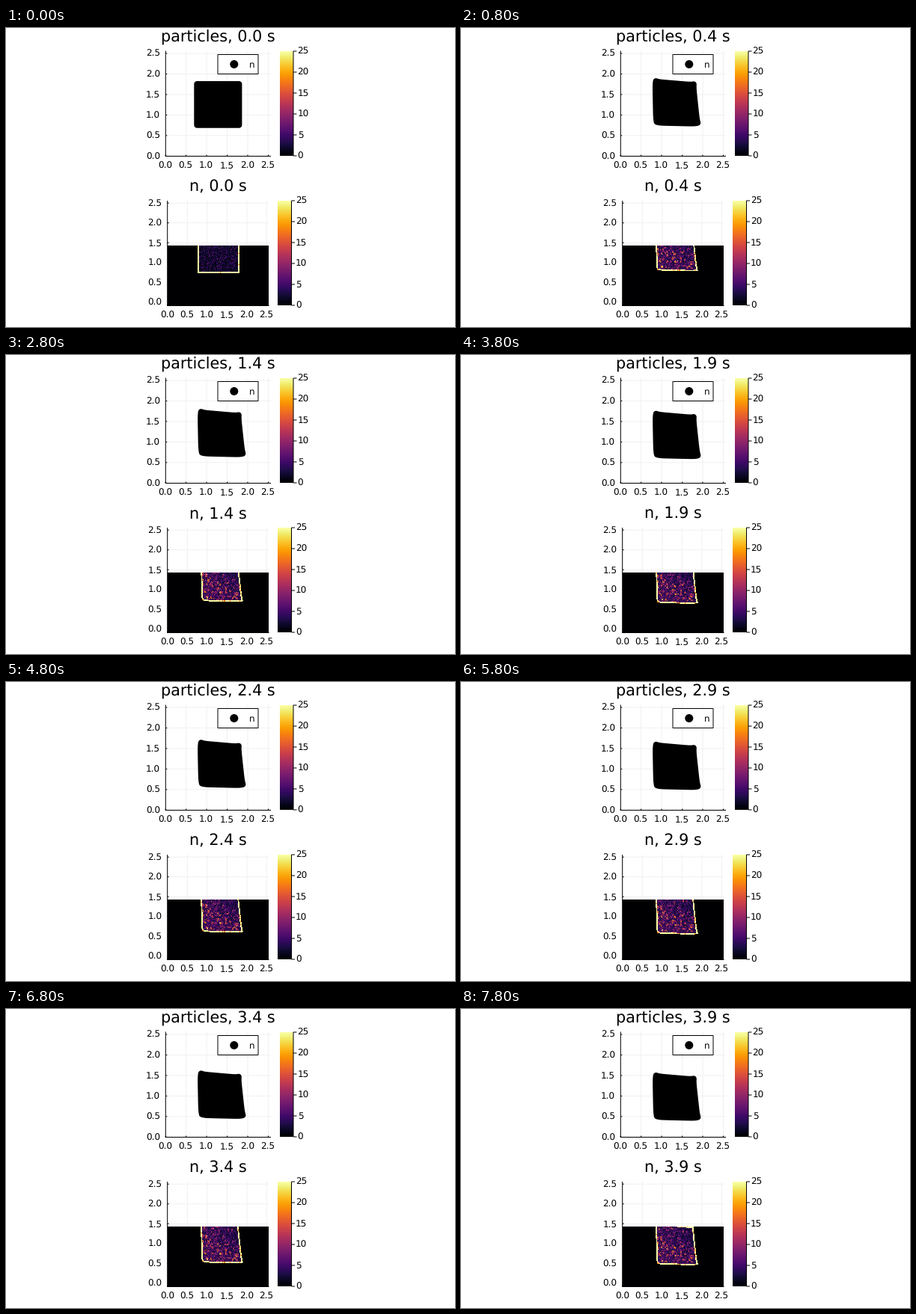
Write a matplotlib script that moves like this. It is 600 px wide and 400 px high and loops after 8 s.

```python
import numpy as np
import matplotlib.pyplot as plt
from matplotlib.animation import FuncAnimation
from matplotlib.patches import Circle, Polygon, Rectangle

W, H, DPI = 600, 400, 100
PX = 72 / DPI
STEPS, INTERVAL = 40, 200
FALL = 0.094          # sinking speed, units per second
SETTLE = 0.12         # time constant of the initial kick, seconds
CELLS = 56

# corners: top-left, top-right, bottom-right, bottom-left
SQUARE = np.array([[.765, 1.755], [1.79, 1.755], [1.79, .755], [.765, .755]])
SKEWED = np.array([[.865, 1.868], [1.78, 1.789], [1.882, .851], [.885, .874]])

rng = np.random.default_rng(7)
grain = rng.gamma(2, .5, (CELLS, CELLS))
blobs = rng.random((20, 20)) ** 8 * 11
gaps = rng.random((CELLS, CELLS))

plt.rcParams["font.family"] = "DejaVu Sans"
plt.rcParams["text.hinting"] = "none"
fig = plt.figure(figsize=(W / DPI, H / DPI), dpi=DPI, facecolor="white")
ax = fig.add_axes([0, 0, 1, 1])


def top_px(x, y):
    return 213.2 + 54.9 * x, 171.3 - 54.9 * y


def low_px(x, y):
    return 215.9 + 53 * x, 366.7 - 53 * y


def line(x0, y0, x1, y1, color="black", z=4):
    ax.plot([x0, x1], [y0, y1], color=color, lw=PX, zorder=z,
            solid_capstyle="butt", snap=False)


def label(x, y, text, size=12, ha="center"):
    return ax.text(x, y, text, fontsize=size * PX, ha=ha, va="baseline",
                   zorder=6)


def panel(to_px, left, top, right, bottom):
    for k in range(6):
        x, y = to_px(k / 2, k / 2)
        line(x, top, x, bottom, "#f1f1f1", z=1)
        line(left, y, right, y, "#f1f1f1", z=1)
        line(x, bottom - 2, x, bottom)
        line(left, y, left + 2, y)
        label(x - .4, bottom + 16.2, f"{k / 2:.1f}")
        label(left - 7.1, y + 4.2, f"{k / 2:.1f}", ha="right")
    line(left, top, left, bottom + .5)
    line(left, bottom, right, bottom)


def colorbar(left, right, top, bottom):
    ramp = np.linspace(1, 0, 256)[:, None]
    ax.imshow(ramp, cmap="inferno", extent=(left, right, bottom, top),
              aspect="auto", zorder=3)
    edge = right + .5
    line(edge, top, edge, bottom)
    for k in range(6):
        y = bottom - k * (bottom - top) / 5
        line(edge, y, edge + 4.5, y)
        label(edge + 5.6, y + 4.2, str(5 * k), ha="left")


def body(t):
    """Corners of the block and how far it has been bent."""
    e = 1 - np.exp(-t / SETTLE)
    corners = SQUARE + (SKEWED - SQUARE) * e
    return corners - [0, FALL * t], e


def place(u, v, corners, e):
    """Map block coordinates in -1..1 to plot coordinates."""
    tl, tr, br, bl = corners
    a, b = (1 + u) / 2, (1 + v) / 2
    out = [(1 - a) * b * tl[i] + a * b * tr[i]
           + a * (1 - b) * br[i] + (1 - a) * (1 - b) * bl[i]
           for i in (0, 1)]
    cu, cv = np.clip(u, -1, 1), np.clip(v, -1, 1)
    x = out[0] - e * .016 * (1 - cv ** 6)
    y = out[1] - e * .02 * (1 - cu ** 8)
    return x, y


def locate(x, y, corners, e):
    """Invert place() by a few corrected steps."""
    tl, tr, br, bl = corners
    du = (tr + br - tl - bl) / 4
    dv = (tl + tr - bl - br) / 4
    inv = np.linalg.inv(np.column_stack([du, dv]))
    u, v = np.zeros_like(x), np.zeros_like(x)
    for _ in range(6):
        px, py = place(u, v, corners, e)
        rx, ry = x - px, y - py
        u = u + inv[0, 0] * rx + inv[0, 1] * ry
        v = v + inv[1, 0] * rx + inv[1, 1] * ry
    return u, v


def outline(corners, e):
    s = np.linspace(-1, 1, 40)
    one = np.ones_like(s)
    u = np.concatenate([s, one, -s, -one])
    v = np.concatenate([one, -s, -one, s])
    return np.column_stack(top_px(*place(u, v, corners, e)))


# centres of the heatmap cells in plot coordinates
gx, gy = np.meshgrid((np.arange(135) + .5) / 53,
                     (366.7 - (291.5 + np.arange(80))) / 53)


def cell(c, n):
    return np.clip(((c + 1) / 2 * n).astype(int), 0, n - 1)


def density(corners, e):
    u, v = locate(gx, gy, corners, e)
    i, j = cell(v, CELLS), cell(u, CELLS)
    hatch = np.where((i + j) % 2, 1.25, .7)
    shade = 1 - .45 * (u + v) / 2
    calm = 2.4 * grain[i, j]
    busy = hatch * shade * (1.6 + 2.8 * grain[i, j]
                            + blobs[cell(v, 20), cell(u, 20)])
    value = calm + (busy - calm) * e
    m = np.maximum(abs(u), abs(v))
    rim = np.where(gaps[i, j] < .03 + .06 * e, 18, 25)
    value = np.where(m > .962, rim, value)
    return np.where(m > 1.036, 0, value)


panel(top_px, 213.3, 30.5, 354, 171.5)
panel(low_px, 215.7, 231, 351.5, 371.5)
colorbar(365.5, 383.5, 31, 171)
colorbar(363, 381, 231, 371)

ax.add_patch(Rectangle((283, 35.5), 54, 26, fc="white", ec="black",
                       lw=PX, zorder=5, snap=False))
ax.add_patch(Circle((304.8, 48.5), 5.5, color="black", lw=0, zorder=6))
label(325, 52.8, "n", ha="left")

block = Polygon(outline(*body(0)), closed=True, fc="black", ec="black",
                lw=7.8 * PX, joinstyle="round", zorder=3, snap=False)
ax.add_patch(block)
heat = ax.imshow(density(*body(0)), cmap="inferno", vmin=0, vmax=25,
                 extent=(216, 351, 371, 291), interpolation="nearest",
                 aspect="auto", zorder=3)
titles = [(name, label(283.2, y, "", 20.8))
          for name, y in (("particles", 18.5), ("n", 218.5))]

ax.set(xlim=(0, W), ylim=(H, 0))
ax.axis("off")


def update(k):
    t = k / 10
    state = body(t)
    block.set_xy(outline(*state))
    heat.set_data(density(*state))
    for name, text in titles:
        text.set_text(f"{name}, {t:.1f} s")
    return [block, heat] + [text for _, text in titles]


anim = FuncAnimation(fig, update, frames=STEPS, interval=INTERVAL,
                     repeat=True, repeat_delay=0, blit=False)
plt.show()
```
